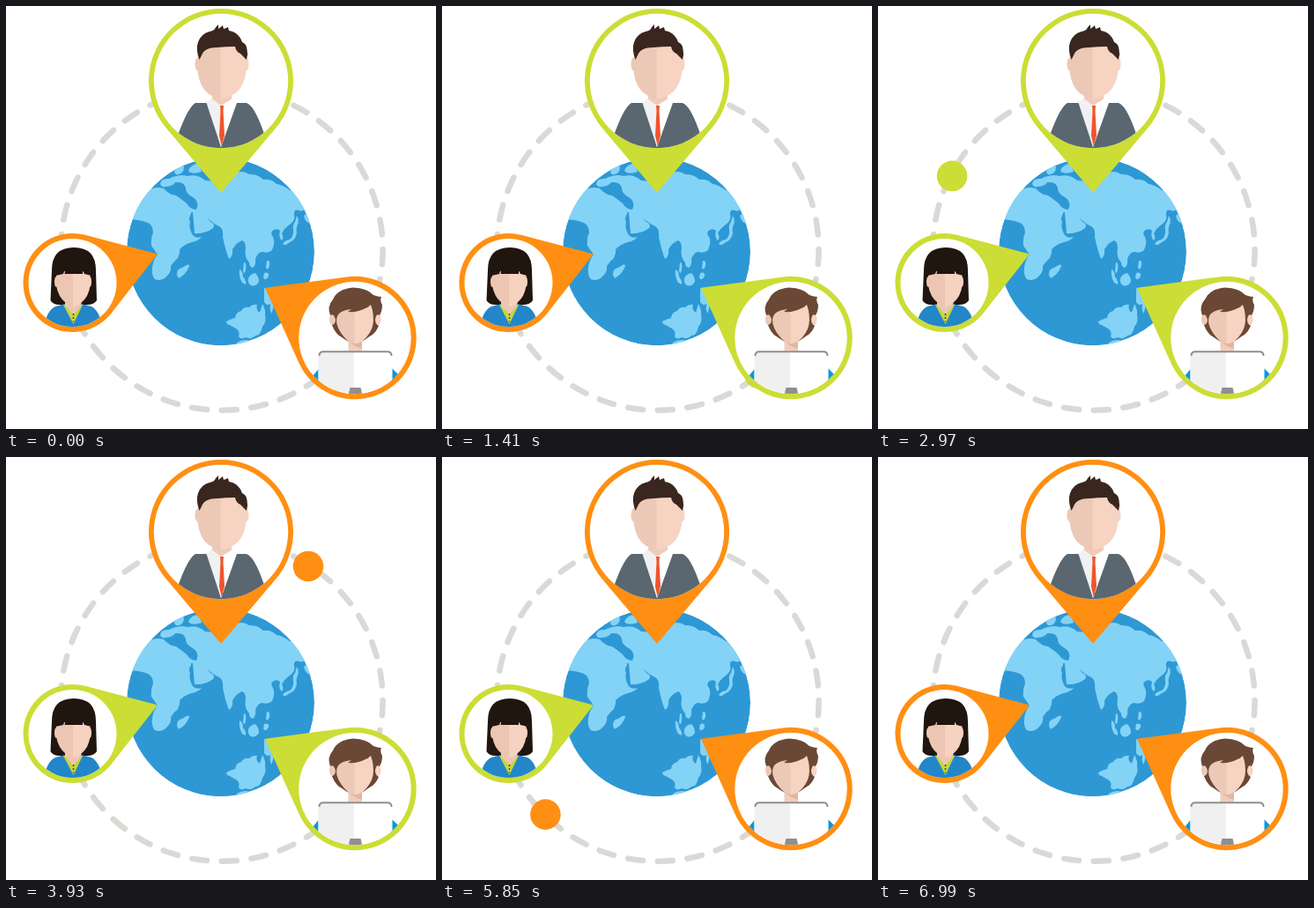
An HTML page for the animation above (7200 ms loop, 488 px wide and 480 px high).

```html
<!DOCTYPE html>
<html lang="en">
<head>
<meta charset="utf-8">
<title>Connected people</title>
<style>
html, body { margin: 0; width: 100%; height: 100%; overflow: hidden; background: #fff; }
svg { display: block; width: 488px; height: 480px; }
</style>
</head>
<body>
<svg viewBox="0 0 488 480">
  <defs>
    <clipPath id="globeClip"><circle cx="243.500" cy="278.700" r="106.500"/></clipPath>
    <clipPath id="manClip"><circle cx="244" cy="85" r="76.2"/></clipPath>
    <clipPath id="boyClip"><circle cx="396" cy="376.5" r="63.7"/></clipPath>
    <clipPath id="womanClip"><circle cx="75.5" cy="314" r="50"/></clipPath>
  </defs>

  <circle cx="244.9" cy="276.1" r="182.7" fill="none" stroke="#d9dad6" stroke-width="6.5"
    stroke-linecap="round" pathLength="34" stroke-dasharray=".505 .495"/>

  <g clip-path="url(#globeClip)">
    <circle cx="243.5" cy="278.7" r="106.5" fill="#2e98d4"/>
    <g fill="#83d3f7">
      <!-- Africa, Europe and Asia -->
      <path d="M136 242Q151 242 161 246Q167 249 167 257Q164 263 165 272L172 282Q167 288 166 297Q165 306 169 310Q177 313 183 306
        Q188 301 187 295Q190 290 195 286Q198 279 197 276Q203 270 211 268Q219 266 222 262Q215 264 212 260Q207 252 209 245Q206 240 211 235
        L213 258Q226 259 235 252Q238 248 232 245L228 240Q235 247 242 250Q247 253 246 262Q249 277 253 287Q258 284 257 276
        Q262 268 268 266Q272 268 272 275Q270 284 276 291Q276 296 280 297Q284 294 283 287Q286 279 291 279Q298 281 302 277
        Q306 268 303 262Q299 257 304 254Q308 252 311 255Q309 263 313 266Q316 263 313 258Q316 252 322 248Q329 243 327 237Q326 230 333 232
        Q337 234 340 229L345 222Q337 210 322 209Q314 203 307 202Q301 196 292 197Q285 190 276 191Q269 186 262 189L250 200L226 198
        Q217 190 206 193Q196 190 189 195Q186 199 194 200Q202 200 203 205Q204 213 212 217Q220 222 216 231Q209 231 205 224
        Q199 219 193 215Q185 214 179 207Q170 204 160 210L140 222Z"/>
      <path d="M175 202Q176 195 185 196Q193 191 197 195Q190 205 181 205Q177 206 175 202ZM191 187Q198 179 202 182Q202 190 196 191Q191 192 191 187Z"/>
      <path d="M207 187Q210 179 219 179L222 188Q211 192 207 187Z"/>
      <!-- Islands -->
      <path d="M194 304Q194 298 200 297Q208 291 208 295Q205 303 199 307Q195 311 194 304Z"/>
      <path d="M330 238Q333 243 331 248Q329 252 330 258Q328 266 322 268Q317 273 314 270Q316 266 322 265Q327 261 326 254Q325 248 328 245Z"/>
      <path d="M338 238Q341 234 344 239L347 247Q340 247 338 238Z"/>
      <path d="M265 299Q269 301 269 307Q273 312 272 316L268 314Q264 307 265 299Z"/>
      <path d="M275 309Q277 304 283 303Q287 307 287 313Q283 319 278 317Q274 315 275 309Z"/>
      <path d="M270 291Q273 290 272 299Q271 306 269 301ZM296 289Q300 288 299 295Q297 301 295 297ZM293 303Q299 301 298 307Q294 313 292 308Z"/>
      <path d="M293 320Q302 323 304 333Q304 344 301 349Q299 344 300 338Q296 341 293 336Z"/>
      <!-- Australia -->
      <path d="M250 358Q255 355 260 354Q261 347 267 346Q270 341 276 342Q280 338 285 339Q283 345 288 348L291 338Q295 345 294 351Q296 358 291 364
        Q289 374 283 374Q279 379 272 376Q266 379 264 375Q266 369 261 366Q257 364 254 362Q250 361 250 358Z"/>
      <path d="M262 382Q269 377 278 380L276 386L262 388Z"/>
    </g>
    <path d="M188 205Q195 204 198 211Q200 216 205 216M202 204Q205 211 202 217M211 234L213 258" fill="none" stroke="#2e98d4" stroke-width="2"/>
  </g>

  <circle id="ball" r="17.3"/>
  <g id="pins"></g>

  <!-- Man in a suit -->
  <g clip-path="url(#manClip)">
    <path d="M234 98H256V105L260 111L244 124L230 111L234 105Z" fill="#f0cbb9"/>
    <path d="M188 168Q204 116 215 110H230L244 160L261 110H273Q285 114 300 168Z" fill="#5a6770"/>
    <path d="M227.500 110L233 105L244 113V160Z" fill="#f1f1f3"/>
    <path d="M262 110L257 105L244 113V160Z" fill="#fff"/>
    <path d="M243 113H247L246.500 119L248 147L244.700 159L242 147L243.500 119Z" fill="#f0542b"/>
    <ellipse cx="217.500" cy="66" rx="3" ry="7.5" fill="#ecc9b6"/>
    <ellipse cx="272.500" cy="66" rx="3" ry="7.5" fill="#f7d3c2"/>
    <path d="M244 42H231Q217 44 217 64Q217 94 234 102Q239 105 244 105Z" fill="#ecc9b6"/>
    <path d="M243.500 42H258Q273 44 273 64Q273 94 255 102Q249 105 243.500 105Z" fill="#f7d3c2"/>
    <path d="M219.500 61Q215 49 218 41Q222 31 231 29Q237 28 238 24L241 21L241 26L246 22L247 26L252 24L253 28Q260 29 264 34Q267 37 268 41
      Q273 43 273.500 49Q275 55 273 61Q270 58 266 54Q261 52 260 46Q250 46 240 47Q225 47 222 56Z" fill="#39261f"/>
  </g>

  <!-- Boy behind a screen -->
  <g clip-path="url(#boyClip)">
    <path d="M340 430L357 409V446H340ZM436 409L455 428V446H436Z" fill="#0c94db"/>
    <path d="M388.500 375H404V395H388.500Z" fill="#f2ccba"/>
    <path d="M388.500 377H404V389Q394 386 388.500 380Z" fill="#dfb7a2"/>
    <ellipse cx="371" cy="355.500" rx="4" ry="7" fill="#ecc9b6"/>
    <ellipse cx="421.500" cy="355.500" rx="4" ry="7" fill="#f7d3c2"/>
    <path d="M396 338H374V358Q377 376 389 381Q392 383 396 383Z" fill="#ecc9b6"/>
    <path d="M395.500 338H418V358Q415 376 403 381Q400 383 395.500 383Z" fill="#f7d3c2"/>
    <path d="M368 351Q364 341 371 333Q376 321 394 319.500Q410 320 417 328Q422 330 426 330Q424 334 427 339Q427 346 424 351Q420 348 419 356
      Q419 361 423 363Q419 372 414 374L404 381Q415 371 416.500 361Q418 350 414 339Q411 342 408 343Q399 348 388 347L392 344Q382 345 378 349
      Q374 353 375.500 361Q378 371 389 381L378 374Q373 370 370 362Q374 361 374 356Q372 348 368 351Z" fill="#6b4835"/>
    <path d="M354.500 446V397Q354.500 391.500 360 391.500H433Q438.500 391.500 438.500 397V446Z" fill="#fff"/>
    <path d="M354.500 446V397Q354.500 392 360 392H395V446Z" fill="#f0f0f1"/>
    <path d="M355.500 397Q355.500 392.300 360 392.300H433Q437.500 392.300 437.500 397" fill="none" stroke="#8f8f91" stroke-width="2"/>
    <path d="M390.500 433H402.500L404.500 441H388.500Z" fill="#8f8f91"/>
  </g>

  <!-- Woman -->
  <g clip-path="url(#womanClip)">
    <path d="M52 300Q52 274 77 274Q102 274 102 300L103 334Q100 339 92 339H61Q53 339 50.500 334Z" fill="#20150f"/>
    <path d="M43 368Q45 346 56 341L67 338L76 349L86 338L97 341Q107 346 110 368Z" fill="#2386c9"/>
    <path d="M65 339H87L76.500 361Z" fill="#c6d63c"/>
    <path d="M67 332H85.500V340L76.500 350L67 340Z" fill="#ecc6b2"/>
    <ellipse cx="57" cy="313" rx="2" ry="6" fill="#ecc6b2"/>
    <ellipse cx="95" cy="313" rx="2" ry="6" fill="#f6d2c0"/>
    <path d="M76.500 301H57V317Q59 330 68 337Q72 341 76.500 341Z" fill="#ecc6b2"/>
    <path d="M76 301H95.500V317Q94 330 85 337Q81 341 76 341Z" fill="#f6d2c0"/>
    <path d="M56 306V296H97V306L89 304L87 300V304H66.500L69 292L65 304Z" fill="#20150f"/>
    <g fill="#38441c"><circle cx="76.500" cy="350" r=".9"/><circle cx="76.500" cy="354" r=".9"/><circle cx="76.500" cy="358" r=".7"/></g>
  </g>
</svg>
<script>
const LOOP = 7200, LAP = 3600, STEP = 30;
const GREEN = '#ccdd35', ORANGE = '#ff8f12';
const hub = { x: 245, y: 276.7, r: 181.4 };
const ball = document.getElementById('ball');
const layer = document.getElementById('pins');

// Each pin takes the ball's colour at its own moment in the lap.
const pins = [
  { x: 244, y: 85, r: 82, tip: [244, 212], inner: 76.2, at: 0 },
  { x: 396, y: 376.5, r: 69.7, tip: [294, 319.7], inner: 63.7, at: 1200 },
  { x: 75.5, y: 314, r: 56, tip: [172, 281.4], inner: 50, at: 2550 }
];

function add(parent, name, attrs) {
  const el = document.createElementNS('http://www.w3.org/2000/svg', name);
  for (const key in attrs) el.setAttribute(key, attrs[key]);
  return parent.appendChild(el);
}

// Outline: two tangents from the tip joined by the far arc of the circle.
function pinPath({ x, y, r, tip }) {
  const dx = tip[0] - x, dy = tip[1] - y;
  const aim = Math.atan2(dy, dx), spread = Math.acos(r / Math.hypot(dx, dy));
  const point = a => `${x + r * Math.cos(a)} ${y + r * Math.sin(a)}`;
  return `M${tip}L${point(aim + spread)}A${r} ${r} 0 1 1 ${point(aim - spread)}Z`;
}

for (const pin of pins) {
  pin.shape = add(layer, 'path', { d: pinPath(pin) });
  add(layer, 'circle', { cx: pin.x, cy: pin.y, r: pin.inner, fill: '#fff' });
}

// Degrees clockwise from the top; the last stretch is slightly faster.
function ballAngle(t) {
  return t < 2700 ? t * 0.1 - 0.3 : 269.7 + (t - 2700) * 0.103;
}

function draw(ms) {
  const t = Math.floor((ms % LOOP) / STEP) * STEP;
  const lapTime = t % LAP;
  const [fresh, old] = t < LAP ? [GREEN, ORANGE] : [ORANGE, GREEN];
  const a = ballAngle(lapTime) * Math.PI / 180;
  ball.setAttribute('cx', hub.x + hub.r * Math.sin(a));
  ball.setAttribute('cy', hub.y - hub.r * Math.cos(a));
  ball.setAttribute('fill', fresh);
  for (const pin of pins) pin.shape.setAttribute('fill', lapTime >= pin.at ? fresh : old);
}

const start = performance.now();
function tick() {
  draw(performance.now() - start);
  requestAnimationFrame(tick);
}
tick();
</script>
</body>
</html>
```
